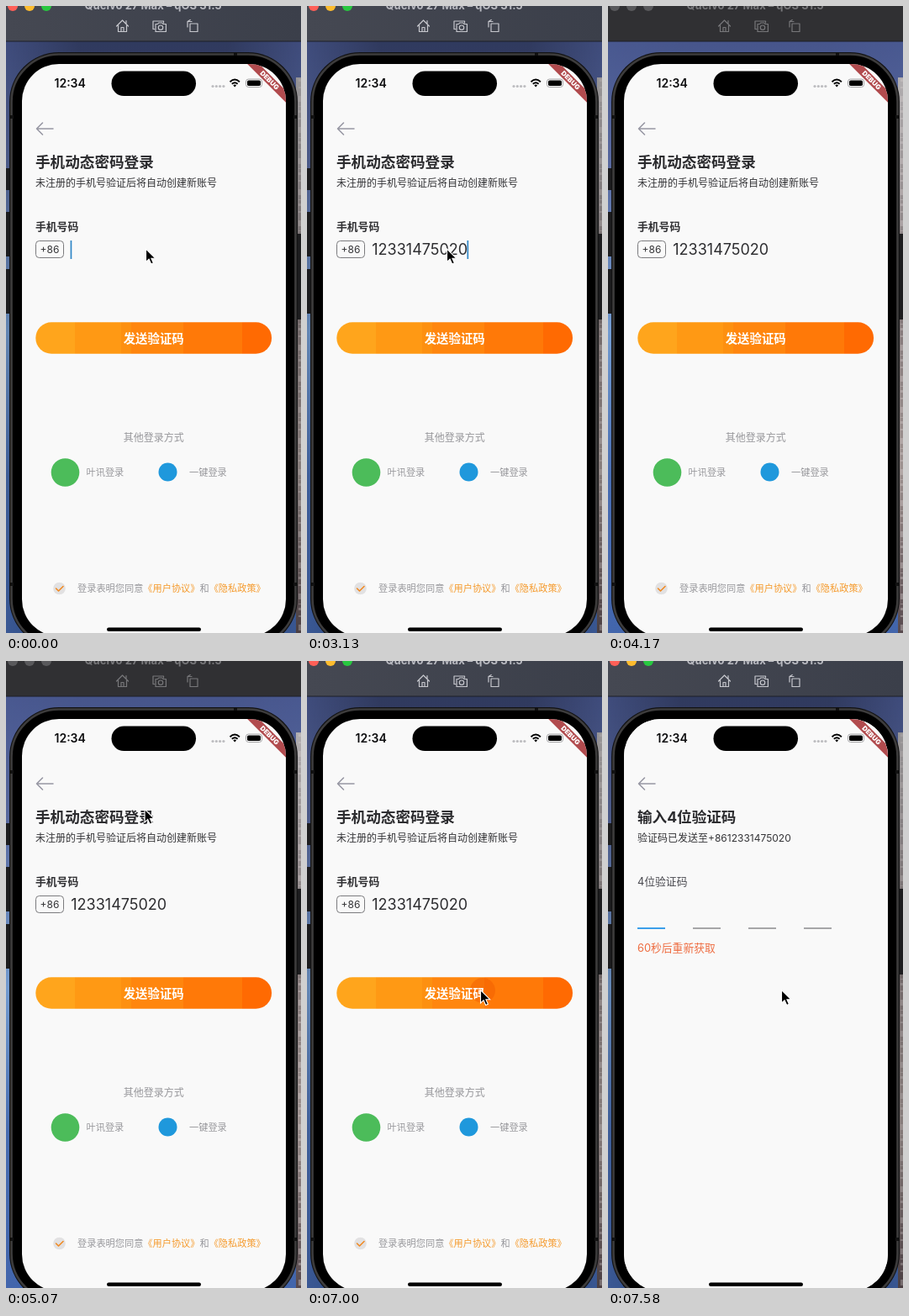
These frames come from a looping animation (351 px wide and 746 px high, 8 s). An HTML page:

```html
<!DOCTYPE html>
<html lang="zh-CN">
<head>
<meta charset="utf-8">
<title>Login</title>
<style>
  html, body { margin: 0; width: 100%; height: 100%; overflow: hidden; background: #000; }
  svg { display: block; font-family: Inter, "Noto Sans CJK SC", "Noto Sans CJK", sans-serif; }
  .line { fill: none; stroke-linecap: round; stroke-linejoin: round; }
  .h1 { font-size: 17.6px; font-weight: 700; fill: #2b2b2e; }
  .body { font-size: 12px; fill: #333336; }
  .label { font-size: 12.8px; }
  .hint { font-size: 11.2px; fill: #97979b; }
  .mid { text-anchor: middle; }
</style>
</head>
<body>
<svg width="351" height="746" viewBox="0 0 351 746">
  <defs>
    <linearGradient id="sky" x2="0" y2="1">
      <stop offset="0" stop-color="#46558f"/><stop offset=".25" stop-color="#5a6ba2"/>
      <stop offset=".52" stop-color="#76a0d6"/><stop offset=".75" stop-color="#4a70b6"/>
      <stop offset="1" stop-color="#4468b0"/>
    </linearGradient>
    <linearGradient id="rock" x2="0" y2="1">
      <stop offset="0" stop-color="#b5b2b4"/><stop offset=".4" stop-color="#857a7b"/>
      <stop offset=".7" stop-color="#a39795"/><stop offset="1" stop-color="#5a4c50"/>
    </linearGradient>
    <linearGradient id="shadow">
      <stop stop-opacity=".16"/><stop offset=".25" stop-opacity=".36"/>
      <stop offset=".75" stop-opacity=".36"/><stop offset="1" stop-opacity=".16"/>
    </linearGradient>
    <linearGradient id="bar"><stop stop-color="#454852"/><stop offset="1" stop-color="#3b3f4a"/></linearGradient>
    <linearGradient id="orange" gradientUnits="userSpaceOnUse" x1="35" x2="316">
      <stop offset=".167" stop-color="#ffa51c"/><stop offset=".167" stop-color="#ff9914"/>
      <stop offset=".363" stop-color="#ff9914"/><stop offset=".363" stop-color="#fd9010"/>
      <stop offset=".405" stop-color="#fd9010"/><stop offset=".405" stop-color="#ff860e"/>
      <stop offset=".626" stop-color="#ff860e"/><stop offset=".626" stop-color="#ff7908"/>
      <stop offset=".875" stop-color="#ff7908"/><stop offset=".875" stop-color="#ff6a02"/>
    </linearGradient>
    <clipPath id="screen"><rect x="19" y="69" width="314" height="681" rx="44"/></clipPath>
    <clipPath id="pill"><rect x="35.300" y="376.200" width="280.800" height="37.500" rx="18.750"/></clipPath>
    <path id="back" class="line" d="M56 146H36.500M43.500 139L36.500 146L43.500 153" stroke="#9898a4" stroke-width="1.600"/>
  </defs>

  <!-- desktop -->
  <rect width="351" height="746" fill="url(#sky)"/>
  <rect x="345" y="85" width="6" height="661" fill="url(#rock)"/>
  <path d="M349.500 87V746" stroke="#d8d0d0" stroke-width="3" stroke-dasharray="3 6 2 9 7 5 1 4" opacity=".4"/>
  <rect id="shade" width="351" height="746" fill="url(#shadow)"/>

  <!-- phone body -->
  <path d="M0 193h5v26h-5zM0 245h5v53h-5zM0 313h5v53h-5zM346 271h5v102h-5z" fill="#1c1c1e"/>
  <rect x="4" y="55" width="343" height="709" rx="59" fill="#121213"/>
  <rect x="6.500" y="57.500" width="338" height="704" rx="56.500" fill="#000" stroke="#3d3c3c" stroke-width="2.600"/>
  <path d="M4 130h5v4h-5zM342 130h5v4h-5zM4 686h5v4h-5zM342 686h5v4h-5zM271 55h4v4h-4z" fill="#111"/>

  <g clip-path="url(#screen)">
    <rect x="19" y="69" width="314" height="681" fill="#f9f9f9"/>

    <g>
      <use href="#back"/>
      <text class="h1" x="35" y="191.600">手机动态密码登录</text>
      <text class="body" x="35" y="215.400">未注册的手机号验证后将自动创建新账号</text>
      <text class="label" x="35" y="267.300" font-weight="700" fill="#303033">手机号码</text>
      <rect x="35.500" y="279.500" width="33" height="20" rx="4" fill="none" stroke="#7b7b7e"/>
      <text class="body mid" x="52" y="293.500">+86</text>
      <text id="number" x="77.300" y="295.700" font-size="18" fill="#2d2d30"></text>
      <rect id="caret" y="279" width="1.700" height="22" fill="#2f86c6"/>
      <g clip-path="url(#pill)">
        <rect x="35" y="376" width="282" height="38" fill="url(#orange)"/>
        <circle id="ripple" cx="209" cy="392" fill="#f05a00" opacity=".45"/>
      </g>
      <text class="mid" x="175.700" y="400.500" font-size="14.400" font-weight="700" fill="#fff">发送验证码</text>
      <text class="mid" x="175.700" y="517.500" font-size="12" fill="#97979b">其他登录方式</text>
      <circle cx="70.500" cy="555" r="16.800" fill="#4cbc5a"/>
      <text class="hint" x="95.500" y="559">叶讯登录</text>
      <circle cx="192.500" cy="554.500" r="11" fill="#1f98dc"/>
      <text class="hint" x="218" y="559">一键登录</text>
      <circle cx="63.500" cy="693" r="7.300" fill="#e2e1e2"/>
      <path class="line" d="M59.500 693l3 3l5.500-5.500" stroke="#f08a24" stroke-width="1.600"/>
      <text class="hint" x="85" y="697">登录表明您同意<tspan fill="#f59a2c">《用户协议》</tspan>和<tspan fill="#f59a2c">《隐私政策》</tspan></text>
    </g>

    <g id="verify">
      <rect x="19" y="69" width="314" height="681" fill="#f9f9f9"/>
      <use href="#back"/>
      <text class="h1" x="35" y="191.600">输入4位验证码</text>
      <text class="body" x="35" y="215.400">验证码已发送至+86<tspan id="sentTo"></tspan></text>
      <text class="label" x="35" y="267.300" fill="#4a4a50">4位验证码</text>
      <path d="M35 318h33" stroke="#3c9fea" stroke-width="1.800"/>
      <path d="M101 318h33m33 0h33m33 0h33" stroke="#a6a6a8" stroke-width="1.800" fill="none"/>
      <text class="label" x="35" y="345.500" fill="#ee6c40">60秒后重新获取</text>
    </g>

    <!-- status bar -->
    <text x="57.500" y="97" font-size="14" font-weight="600" fill="#0c0c0e">12:34</text>
    <rect x="125.500" y="77.500" width="100.500" height="29.500" rx="14.750"/>
    <g fill="#bdbdc0">
      <circle cx="246" cy="95.500" r="1.600"/><circle cx="250.300" cy="95.500" r="1.600"/>
      <circle cx="254.600" cy="95.500" r="1.600"/><circle cx="258.900" cy="95.500" r="1.600"/>
    </g>
    <path d="M266.500 90.200Q272.200 85 277.900 90.200M268.800 92.700Q272.200 89.600 275.600 92.700" fill="none" stroke="#000" stroke-width="1.900"/>
    <path d="M270.300 94.300Q272.200 92.700 274.100 94.300L272.200 96.500Z"/>
    <rect x="285.500" y="87" width="19" height="9.500" rx="3" fill="none" stroke="#9a9a9c" stroke-width=".900"/>
    <rect x="287" y="88.500" width="16" height="6.500" rx="1.800"/>
    <g transform="translate(333 69) rotate(45)">
      <rect x="-34" y="22.400" width="68" height="10" fill="#b14b4e"/>
      <text class="mid" y="30.200" font-size="8" font-weight="900" fill="#fff">DEBUG</text>
    </g>
    <rect x="120" y="739.500" width="112" height="4.500" rx="2.250"/>
  </g>

  <!-- simulator window bar -->
  <rect id="titleBar" width="351" height="42"/>
  <path d="M0 42h351" stroke="#1d1f26"/>
  <circle class="light" cx="8" r="6"/><circle class="light" cx="28" r="6"/><circle class="light" cx="48" r="6"/>
  <g id="tools">
    <text class="mid" x="175" y="4" font-size="13" font-weight="700">Quelvo 27 Max – qOS 31.5</text>
    <g class="line" stroke="currentColor" stroke-width="1.200">
      <path d="M131.500 24L138.500 17L145.500 24M133.500 23v7.500h10v-7.500M137 30.500v-5h3v5M143 21v-3.500"/>
      <path d="M177 27.500h-2v-9.500h12.500v2"/>
      <path d="M178 21.500h2.500l1.200-1.500h4l1.200 1.500h3.500v9h-12.400z"/><circle cx="184" cy="25.700" r="2.700"/>
      <path d="M219 21h9v9.500h-9zM216 25v-6.500h5M219.200 16.500l-3.200 2"/>
    </g>
  </g>

  <path id="mouse" d="M0 0V15.500L3.600 12.200L6.200 18L8.900 16.800L6.400 11.200H11.200Z" stroke="#fff" stroke-width="1.100"/>
</svg>
<script>
const LOOP = 8000, STEP = 148.8;
const PHONE = '12331475020';
const KEY_TICKS = [2, 5, 6, 8, 9, 12, 15, 16, 19, 20, 21];
const LIGHTS = ['#ff5f57', '#febc2e', '#28c840'];
const MOUSE_PATH = [
  [0, 166.5, 289], [3430, 166.5, 289], [4020, 420, 230], [4170, 400, 500], [4620, 190, 352],
  [5060, 165, 176], [5800, 192, 291], [6250, 192, 291], [6840, 206.5, 391.5], [LOOP, 206.5, 391.5]
];

const $ = id => document.getElementById(id);
const clamp = v => Math.max(0, Math.min(1, v));
const lights = document.querySelectorAll('.light');
$('sentTo').textContent = PHONE;

function mouseAt(t) {
  const i = MOUSE_PATH.findIndex(p => p[0] > t);
  const [t0, x0, y0] = MOUSE_PATH[i - 1], [t1, x1, y1] = MOUSE_PATH[i];
  const k = (t - t0) / (t1 - t0);
  return [x0 + (x1 - x0) * k, y0 + (y1 - y0) * k];
}

// Solid for half a second, then fades out and back in.
function caretOpacity(t) {
  if (t < 3340) return 1;
  const phase = (t - 3340) % 1000 / 1000;
  return phase < 0.7 ? clamp((0.62 - phase) / 0.12) : clamp((phase - 0.86) / 0.14);
}

function setFocus(active) {
  $('shade').style.opacity = active ? 1 : 0.15;
  $('titleBar').setAttribute('fill', active ? 'url(#bar)' : '#303033');
  $('tools').style.color = active ? '#c6c7cd' : '#77777a';
  $('tools').setAttribute('fill', active ? '#b9bac1' : '#77777a');
  lights.forEach((dot, i) => dot.setAttribute('fill', active ? LIGHTS[i] : '#59595c'));
}

function draw(now) {
  const tick = Math.floor((now % LOOP + 10) / STEP);
  const t = Math.min(tick * STEP, LOOP - 1);

  const number = $('number');
  number.textContent = PHONE.slice(0, KEY_TICKS.filter(k => k <= tick).length);
  $('caret').setAttribute('x', 76.6 + number.getComputedTextLength());
  $('caret').style.opacity = caretOpacity(t);

  setFocus(t < 3870 || t > 6300);
  $('mouse').setAttribute('transform', `translate(${mouseAt(t)})`);
  $('ripple').setAttribute('r', t < 6950 ? 0 : 15 + (t - 6994) * 0.15);

  const left = 1 - clamp((t - 7068) / 300);
  $('verify').setAttribute('transform', `translate(${315 * left * left} 0)`);
}

function loop() {
  draw(performance.now());
  requestAnimationFrame(loop);
}
loop();
</script>
</body>
</html>
```
